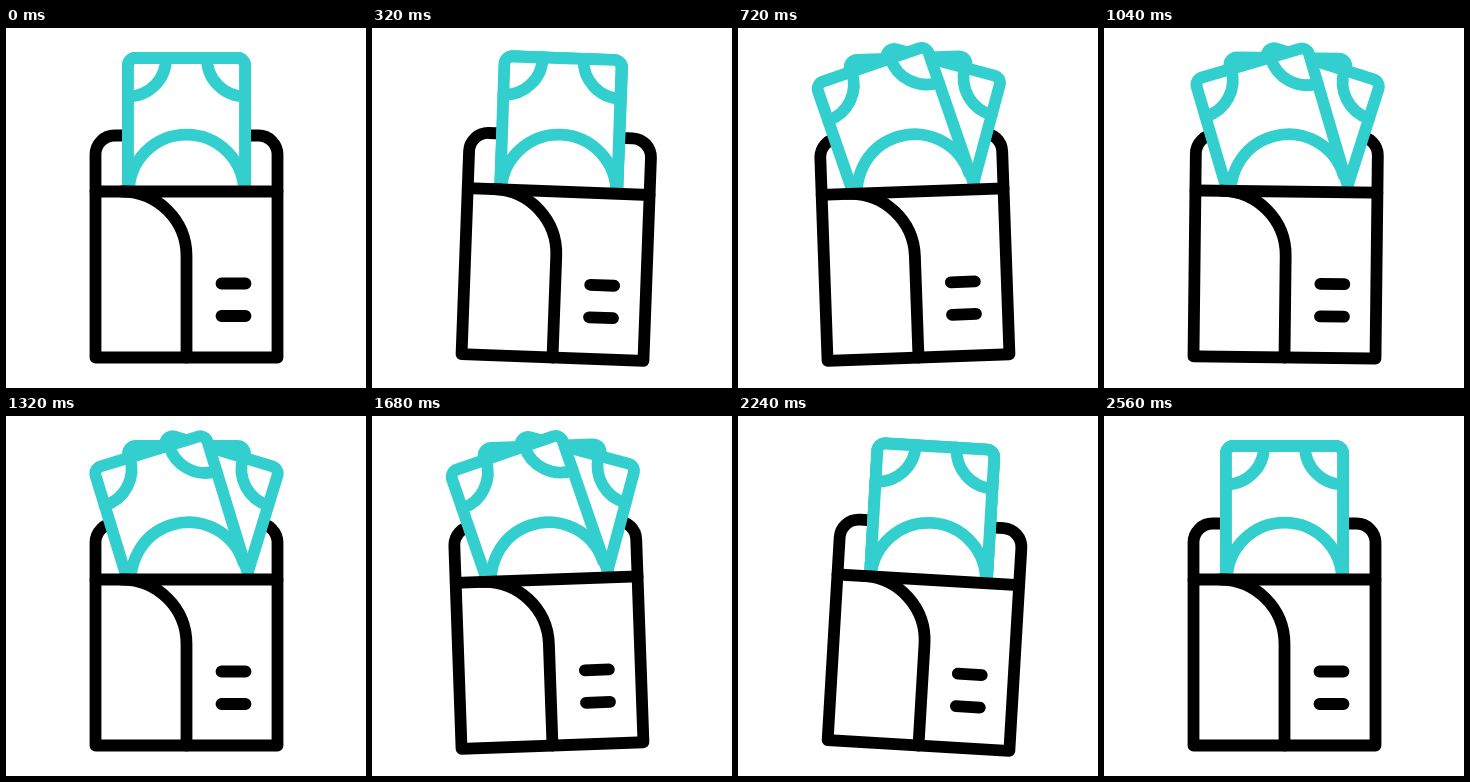
An HTML page for the animation above (2640 ms loop, 360x360 px).

```html
<!DOCTYPE html>
<html lang="en">
<head>
<meta charset="utf-8">
<title>Wallet</title>
<style>
  html, body { margin: 0; width: 100%; height: 100%; overflow: hidden; background: #fff; }
  svg { display: block; width: 100vw; height: 100vh; }
</style>
</head>
<body>
<svg viewBox="0 0 360 360">
  <defs>
    <g id="card" fill="none" stroke="#33cfcf" stroke-width="11.8">
      <rect x="122" y="30" width="117" height="165" rx="7.500" fill="#fff"/>
      <path d="M160 30A38 38 0 0 1 122 68.500M201 30A38 38 0 0 0 239 68.500"/>
      <path d="M123 164A57.500 57.500 0 0 1 238 164"/>
    </g>
  </defs>
  <g id="wallet" fill="none" stroke="#000" stroke-width="11.8" stroke-linecap="round" stroke-linejoin="round">
    <path d="M89.500 163.500V126.500A19 19 0 0 1 108.500 107.500H252.500A19 19 0 0 1 271.500 126.500V163.500" fill="#fff"/>
    <use href="#card"/>
    <use id="right" href="#card"/>
    <use id="left" href="#card"/>
    <rect x="89.500" y="163.500" width="182" height="166" fill="#fff"/>
    <path d="M116 163.500A64.500 64.500 0 0 1 180.500 228V329.500"/>
    <path d="M215.500 255.500H239.500M215.500 288H239.500"/>
  </g>
</svg>
<script>
  const LOOP = 2640, STEP = 40, SPREAD = 17;
  const [wallet, left, right] = ['wallet', 'left', 'right'].map(id => document.getElementById(id));

  // Smooth rise from 0 to 1 between two times
  function ramp(t, from, to) {
    const u = Math.min(1, Math.max(0, (t - from) / (to - from)));
    return u * u * (3 - 2 * u);
  }

  // Rock from rest through each peak angle and back to rest, one beat per move
  function sway(t, start, beat, ...peaks) {
    let angle = 0;
    [...peaks, 0].forEach((peak, i) => {
      const from = start + i * beat;
      angle += (peak - angle) * ramp(t, from, from + beat);
    });
    return angle;
  }

  function turn(el, angle, y) {
    el.setAttribute('transform', `rotate(${angle.toFixed(3)} 180.5 ${y})`);
  }

  function draw(t) {
    const spread = SPREAD * (ramp(t, 300, 600) - ramp(t, 1720, 2130));
    turn(left, -spread, 157);
    turn(right, spread, 157);
    turn(wallet, sway(t, 0, 300, 2.2, -3.8, 1.2) + sway(t, 1450, 340, -2.7, 4.5), 329.5);
  }

  const start = performance.now();
  function tick() {
    const t = (performance.now() - start) % LOOP;
    draw(Math.floor(t / STEP) * STEP);
    requestAnimationFrame(tick);
  }
  tick();
</script>
</body>
</html>
```
